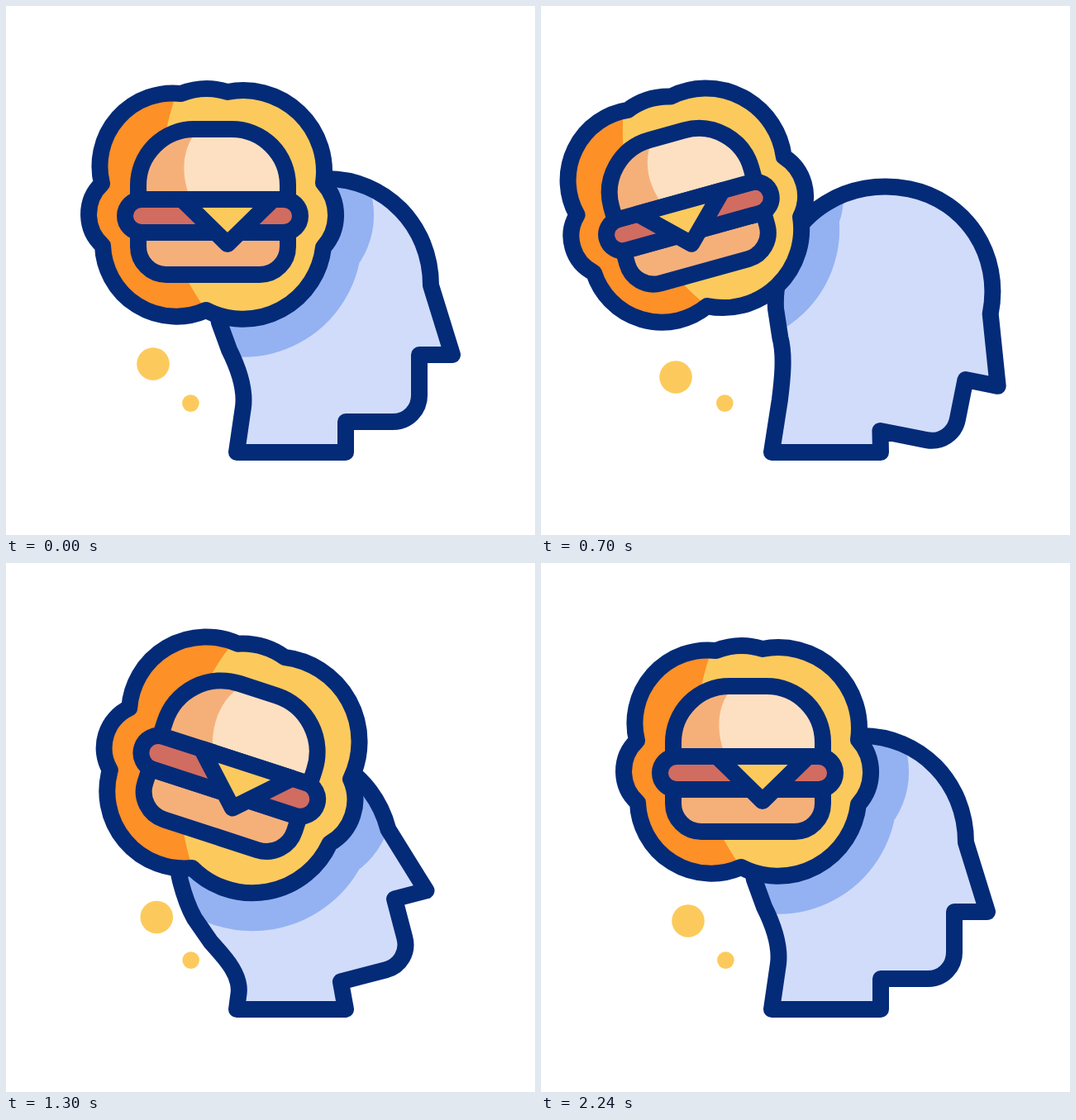
An HTML page that plays this animation: 640 px wide and 640 px high, repeating every 2400 ms.

```html
<!DOCTYPE html>
<html lang="en">
<head>
<meta charset="utf-8">
<title>Thinking of a burger</title>
<style>
  html, body { margin: 0; width: 100%; height: 100%; overflow: hidden; background: #fff; }
  svg { display: block; width: 100vw; height: 100vh; }
  path, rect { vector-effect: non-scaling-stroke; }
  .line { stroke: #042b78; stroke-width: 20; stroke-linejoin: round; stroke-linecap: round; }
</style>
</head>
<body>
<svg viewBox="0 0 640 640">
  <defs>
    <path id="cloud" d="M116 215 A88.500 88.500 0 0 1 212 106 A85 85 0 0 1 268 104 A98 98 0 0 1 384 214
      A58 58 0 0 1 384 292 A98 98 0 0 1 242 368 A89 89 0 0 1 117 290 A51 51 0 0 1 116 215Z"/>
    <path id="bun" d="M160 234 V217 A68 68 0 0 1 228 149 H273 A68 68 0 0 1 341 217 V234Z"/>
    <clipPath id="inCloud"><use href="#cloud"/></clipPath>
    <clipPath id="inBun"><use href="#bun"/></clipPath>
    <clipPath id="inHead"><path class="head"/></clipPath>
  </defs>

  <path class="head" fill="#d1dcfa"/>
  <g clip-path="url(#inHead)">
    <g class="bubble" fill="#94b2f2" stroke="#94b2f2" stroke-width="92"><use href="#cloud"/></g>
  </g>
  <path class="head line" fill="none"/>

  <circle id="dotBig" r="19.8" fill="#fcca5c"/>
  <circle id="dotSmall" r="10.3" fill="#fcca5c"/>

  <g class="bubble">
    <use href="#cloud" fill="#fcca5c"/>
    <path clip-path="url(#inCloud)" fill="#fd9027" d="M207 104 C175 190 183 292 247 374 H80 V90Z"/>
    <use href="#cloud" class="line" fill="none"/>

    <path class="line" fill="#f5b07a" d="M160 274 H341 V291 A34 34 0 0 1 307 325 H194 A34 34 0 0 1 160 291Z"/>
    <rect class="line" fill="#d16c61" x="144" y="234" width="212" height="40" rx="20"/>
    <use href="#bun" fill="#fde0c1"/>
    <path clip-path="url(#inBun)" fill="#f5b07a" d="M232 149 C212 174 211 204 224 236 H150 V140Z"/>
    <use href="#bun" class="line" fill="none"/>
    <path id="cheese" class="line" fill="#fcca5c" d="M213 234 H323 L268 288Z"/>
  </g>
</svg>
<script>
const LOOP = 2400, STEP = 20, BEGIN = 200, END = 2240;
const byId = id => document.getElementById(id);
const heads = document.querySelectorAll('.head');
const bubbles = document.querySelectorAll('.bubble');

// A value that eases from home through a few [time, value] points and back home
function sway(home, ...points) {
  const keys = [[BEGIN, home], ...points, [END, home]];
  return t => {
    if (t <= BEGIN || t >= END) return home;
    const i = keys.findIndex(k => k[0] > t);
    const [t0, a] = keys[i - 1], [t1, b] = keys[i];
    return a + (b - a) * (1 - Math.cos(Math.PI * (t - t0) / (t1 - t0))) / 2;
  };
}

const nod = sway(0, [670, 1], [1220, 0], [1695, 1]);
const lift = sway(0, [670, 0], [1220, 1], [1695, 0]);

const CX = 250.5, CY = 254;
const bubbleX = sway(CX, [765, 177], [1420, 279], [1800, 213]);
const bubbleTilt = sway(0, [500, -15.5], [880, -15.5], [1240, 19], [1800, -16]);
const bubbleScale = sway(1, [500, 0.95], [1230, 1.065], [1540, 0.937], [1850, 0.937]);
const cheeseShift = sway(0, [700, -24], [1220, 0], [1640, -38]);

// Every point travels straight between the poses, so turning also squeezes the head a little
function headPath(n, l) {
  const rest = 1 - n - l;
  const rad = deg => deg * Math.PI / 180;
  const down = rad(11.5), up = rad(-16.5);
  const c = rest + n * Math.cos(down) + l * Math.cos(up);
  const s = n * Math.sin(down) + l * Math.sin(up);
  const chinX = 411 - 0.5 * n - 6.5 * l, chinY = 503 + 11 * n + 3 * l;
  const neckX = 287 + 2 * n - 6 * l, neckY = 485 - 9 * n + 39 * l;
  const p = (x, y) => {
    const dx = x - 411, dy = y - 503;
    return `${chinX + c * dx - s * dy} ${chinY + s * dx + c * dy} `;
  };
  return `M279 540 L${neckX} ${neckY} C${neckX + 3} ${neckY - 24} ${p(280, 436)}${p(270, 416)}`
    + `L${p(258, 383)}C${p(254, 368)}${p(253, 350)}${p(253, 335)}`
    + `C${p(253, 265)}${p(313, 209)}${p(388, 209)}`
    + `C${p(458, 209)}${p(514, 265)}${p(514, 338)}`
    + `L${p(540, 422)}L${p(500, 422)}L${p(500, 471)}`
    + `C${p(500, 489)}${p(486, 503)}${p(468, 503)}L${p(411, 503)}L411 540Z`;
}

const move = (id, x, y) => byId(id).setAttribute('transform', `translate(${x} ${y})`);

function draw(t) {
  const d = headPath(nod(t), lift(t));
  heads.forEach(el => el.setAttribute('d', d));

  const x = bubbleX(t), tilt = bubbleTilt(t), dx = x - CX;
  const y = CY + 0.3 * tilt - 0.07 * dx;
  const place = `translate(${x} ${y}) rotate(${tilt}) scale(${bubbleScale(t)}) translate(${-CX} ${-CY})`;
  bubbles.forEach(el => el.setAttribute('transform', place));
  move('cheese', cheeseShift(t), 0);

  // The dots trail the bubble, the small one hardly at all
  move('dotBig', 178 + 0.21 * dx, 433 - 0.225 * dx);
  move('dotSmall', 223.4 + 0.015 * dx, 480.6);
}

const start = performance.now();
function tick() {
  const t = (performance.now() - start) % LOOP;
  draw(Math.floor(t / STEP) * STEP);
  requestAnimationFrame(tick);
}
tick();
</script>
</body>
</html>
```
